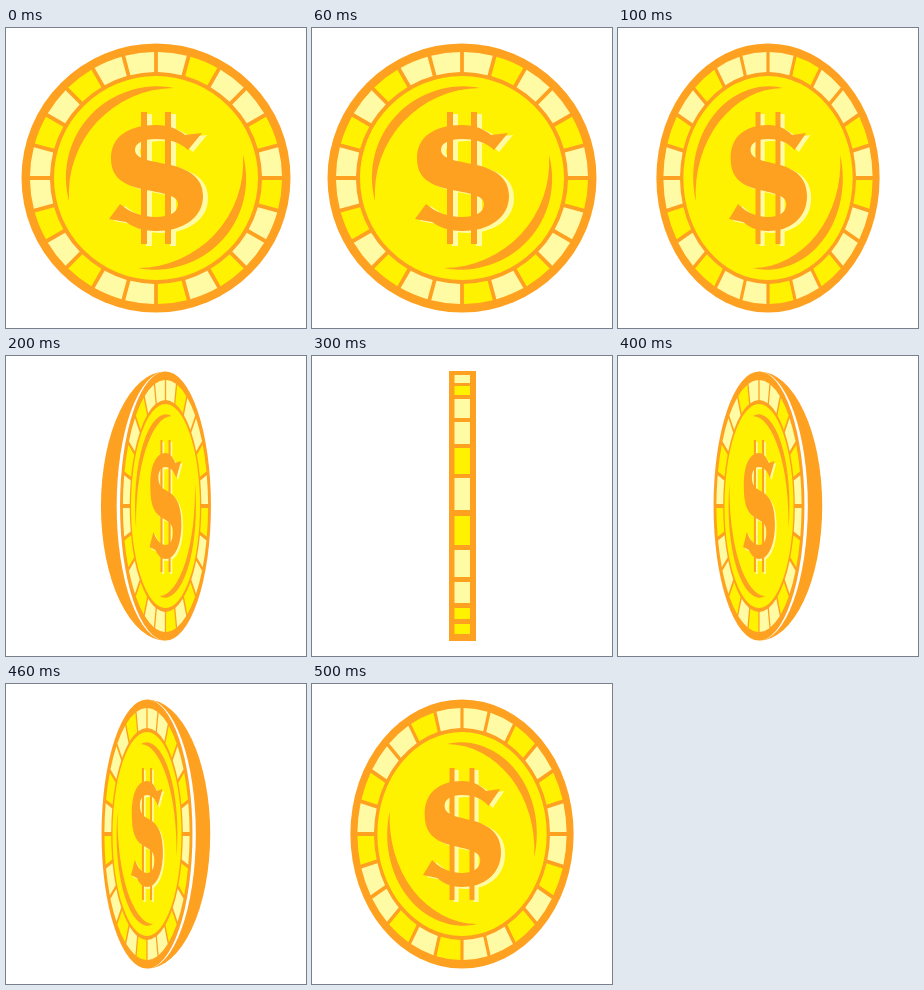
Animation of 300x300 px, one loop 600 ms. Source, as an HTML page with a canvas:

```html
<!DOCTYPE html>
<html lang="en">
<head>
<meta charset="utf-8">
<title>Spinning coin</title>
<style>
  html, body { margin: 0; height: 100%; overflow: hidden; background: #fff; }
  canvas { display: block; width: 100vw; height: 100vh; }
</style>
</head>
<body>
<canvas id="stage" width="300" height="300"></canvas>
<script>
const ctx = document.getElementById('stage').getContext('2d');
const ORANGE = '#ffa120', YELLOW = '#fff200', PALE = '#fffba4';
const TAU = Math.PI * 2;
const STEP = 100;
const RADIUS = 134.5;

// Rim cells clockwise from the top: P pale, Y yellow
const RIM = 'PYPPYPYPPYPYPPYPYPPYPYPP';

// Edge-on cells: top, bottom, kind
const EDGE = [
  [19, 27, 'P'], [30, 39, 'Y'], [43, 62, 'P'], [66, 88, 'P'], [92, 118, 'Y'], [122, 154, 'P'],
  [160, 189, 'Y'], [194, 221, 'P'], [226, 247, 'P'], [252, 263, 'Y'], [268, 278, 'Y']
];

const glyph = new Path2D(
  'M46-45 L32-28 C24-36 12-39 0-39 C-13-39 -21-35 -21-28 C-21-19 -5-17 10-14 ' +
  'C35-9 47 1 47 18 C47 40 27 53 0 53 C-14 53 -23 49 -30 44 L-47 41 L-36 26 ' +
  'C-27 34 -14 39 0 39 C14 39 22 34 22 26 C22 17 6 15 -10 12 C-33 7 -45 0 -45-20 ' +
  'C-45-41 -28-53 0-53 C13-53 22-49 29-43 Z');
const shine = new Path2D(
  'M-87 23 A91 91 0 0 1 18-90 A106 106 0 0 0 -87 23 Z ' +
  'M87-23 A91 91 0 0 1 -18 90 A106 106 0 0 0 87-23 Z');

// cx: centre, sx: width scale, side: width scale of the visible thickness (sign = direction)
const POSES = [
  { cx: 150, sx: 1 },
  { cx: 150, sx: 0.83 },
  { cx: 159.5, sx: 0.338, side: -0.48 },
  null,
  { cx: 141, sx: 0.338, side: 0.47, back: true },
  { cx: 150, sx: 0.83, back: true }
];

const cellColor = kind => kind === 'P' ? PALE : YELLOW;

function disc(r, color) {
  ctx.fillStyle = color;
  ctx.beginPath();
  ctx.arc(0, 0, r, 0, TAU);
  ctx.fill();
}

function dollar(dx, dy, color) {
  ctx.save();
  ctx.translate(dx, dy);
  ctx.fillStyle = color;
  ctx.fillRect(-15, -66, 6, 132);
  ctx.fillRect(9, -66, 6, 132);
  ctx.fill(glyph);
  ctx.restore();
}

function drawFace(back) {
  disc(RADIUS, ORANGE);
  ctx.save();
  if (back) ctx.scale(-1, 1);
  [...RIM].forEach((kind, i) => {
    const a = (i / 24 - 0.25) * TAU, b = a + TAU / 24;
    const outer = 1.9 / 126, inner = 1.9 / 106;
    ctx.fillStyle = cellColor(kind);
    ctx.beginPath();
    ctx.arc(0, 0, 126, a + outer, b - outer);
    ctx.arc(0, 0, 106, b - inner, a + inner, true);
    ctx.fill();
  });
  disc(102, YELLOW);
  ctx.fillStyle = ORANGE;
  ctx.fill(shine);
  ctx.restore();
  dollar(5, 2, PALE);
  dollar(0, 0, ORANGE);
}

function drawEdge() {
  ctx.fillStyle = ORANGE;
  ctx.fillRect(137, 15, 27, 270);
  for (const [top, bottom, kind] of EDGE) {
    ctx.fillStyle = cellColor(kind);
    ctx.fillRect(142.5, top, 15.5, bottom - top);
  }
}

// Half of the coin's body that shows beside the face
function drawSide(sx, color) {
  ctx.fillStyle = color;
  ctx.beginPath();
  ctx.ellipse(0, 0, Math.abs(sx) * RADIUS, RADIUS, 0, -TAU / 4, TAU / 4, sx < 0);
  ctx.fill();
}

function drawCoin({ cx, sx, side, back }) {
  ctx.translate(cx, 150);
  if (side) {
    drawSide(side, ORANGE);
    drawSide(Math.sign(side) * (sx + 0.025), '#fff');
  }
  ctx.scale(sx, 1);
  drawFace(back);
}

function frame() {
  const pose = POSES[Math.floor(performance.now() / STEP) % POSES.length];
  ctx.setTransform(1, 0, 0, 1, 0, 0);
  ctx.fillStyle = '#fff';
  ctx.fillRect(0, 0, 300, 300);
  if (pose) drawCoin(pose);
  else drawEdge();
  requestAnimationFrame(frame);
}
frame();
</script>
</body>
</html>
```
